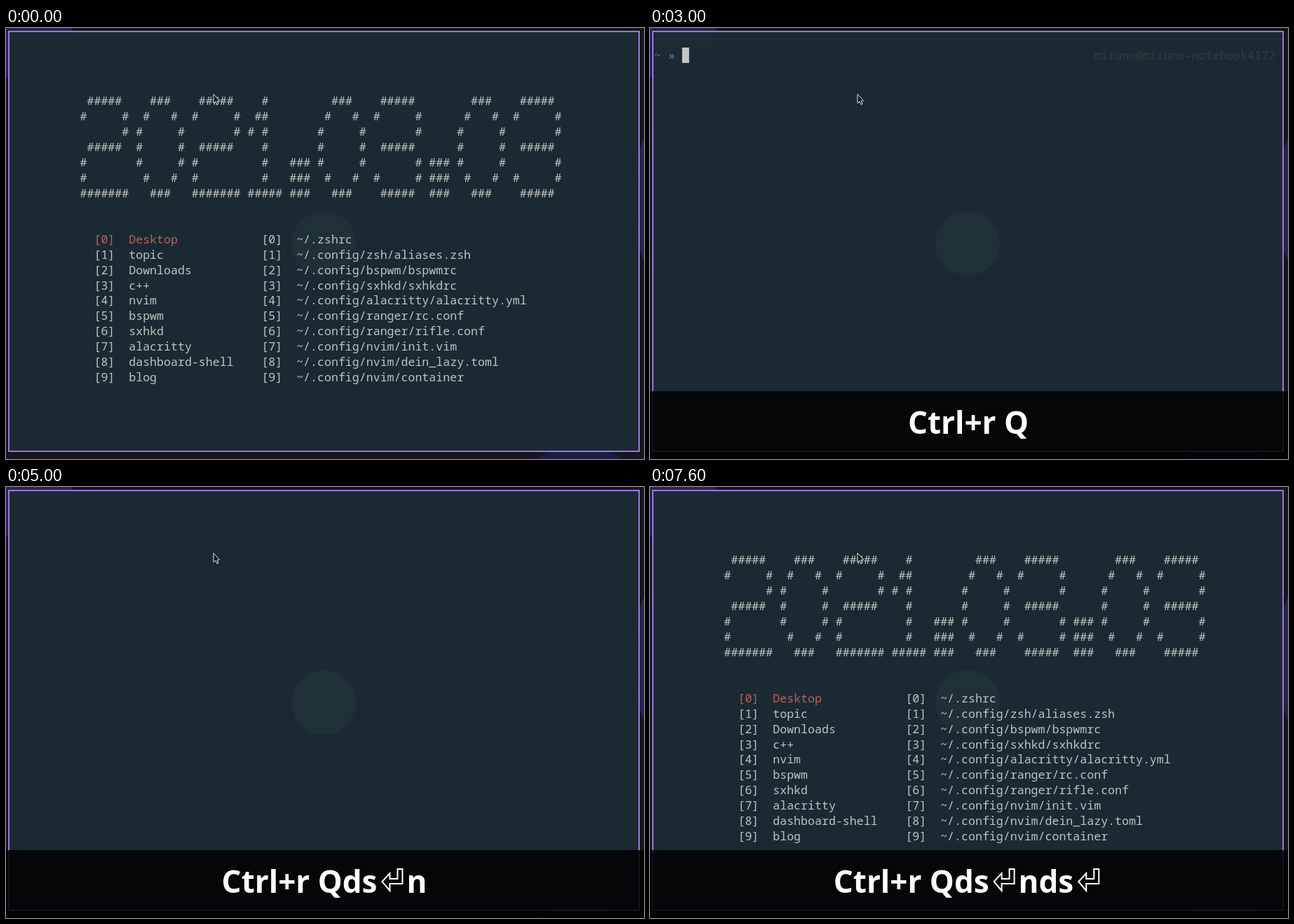
Animation of 910 by 616 pixels, one loop 8 s. Source, as an HTML page with a canvas:

```html
<!DOCTYPE html>
<html lang="en">
<head>
<meta charset="utf-8">
<title>Terminal dashboard</title>
<style>
html, body { margin: 0; width: 100%; height: 100%; overflow: hidden; background: #17151f; }
canvas { display: block; }
</style>
</head>
<body>
<canvas id="stage" width="910" height="616"></canvas>
<script>
const ctx = document.getElementById('stage').getContext('2d');
const LOOP = 8000, CELL = 9.955, LINE = 21.92;
const MONO = '16.6px "Noto Sans Mono", "DejaVu Sans Mono", monospace';
const USER = 'miruno', HOST = 'miruno-notebook4172';
const BG = '#1c2b33', FG = '#bfc3bf', RED = '#cc6666', GREEN = '#b5bd68',
      BLUE = '#7aa6da', DIM = '#363a3f';

const colX = col => 6 + col * CELL;
const rowY = row => 17 + row * LINE;

function put(col, row, text, color = FG, bold = false) {
  ctx.font = (bold ? 'bold ' : '') + MONO;
  ctx.fillStyle = color;
  ctx.fillText(text, colX(col), rowY(row) + 5.8);
}

function rect(x, y, w, h, color) {
  ctx.fillStyle = color;
  ctx.fillRect(x, y, w, h);
}

function disc(x, y, r, color) {
  ctx.fillStyle = color;
  ctx.beginPath();
  ctx.arc(x, y, r, 0, 7);
  ctx.fill();
}

function polygon(points, x, y) {
  ctx.beginPath();
  points.forEach(([px, py]) => ctx.lineTo(x + px, y + py));
  ctx.closePath();
}

function drawDesktop() {
  rect(0, 0, 910, 616, '#17151f');
  disc(10, -15, 86, '#28244e');
  disc(1133, 245, 240, '#28244e');
  disc(818, 707, 110, '#1f1c40');
  ctx.globalAlpha = 0.96;
  rect(4, 5, 899, 600, BG);
  ctx.globalAlpha = 1;
  disc(453, 308, 46, '#203037');
  ctx.strokeStyle = '#9878df';
  ctx.lineWidth = 2;
  ctx.strokeRect(4, 5, 899, 600);
}

// Dashboard
const ZERO = ['  ###  ', ' #   # ', '#     #', '#     #', '#     #', ' #   # ', '  ###  '];
const ONE = ['  #  ', ' ##  ', '# #  ', '  #  ', '  #  ', '  #  ', '#####'];
const TWO = [' ##### ', '#     #', '      #', ' ##### ', '#      ', '#      ', '#######'];
const THREE = [' ##### ', '#     #', '      #', ' ##### ', '      #', '#     #', ' ##### '];
const DOT = ['   ', '   ', '   ', '   ', '###', '###', '###'];
const DATE = [TWO, ZERO, TWO, ONE, DOT, ZERO, THREE, DOT, ZERO, THREE];
const DIRS = 'Desktop topic Downloads c++ nvim bspwm sxhkd alacritty dashboard-shell blog'.split(' ');
const FILES = ('.zshrc .config/zsh/aliases.zsh .config/bspwm/bspwmrc .config/sxhkd/sxhkdrc ' +
  '.config/alacritty/alacritty.yml .config/ranger/rc.conf .config/ranger/rifle.conf ' +
  '.config/nvim/init.vim .config/nvim/dein_lazy.toml .config/nvim/container').split(' ');

function dashboard() {
  for (let i = 0; i < 7; i++) put(10, 4 + i, DATE.map(glyph => glyph[i]).join(' '));
  DIRS.forEach((dir, i) => {
    const color = i ? FG : '#bd5f60';
    put(12, 13 + i, `[${i}]`, color);
    put(17, 13 + i, dir, color);
    put(36, 13 + i, `[${i}]`);
    put(41, 13 + i, '~/' + FILES[i]);
  });
}

// File manager
const HOME = ('beam 10 bin 88 byteexec 1 cache 28 cargo 2 colors 9 config 77 fonts 2 gnupg 5 ' +
  'ipython 3 LfCache 3 local 3 lyrics 0 mozilla 3 nano 1 ncmpcpp 2 npm 5 nvim 1 pki 1 ' +
  'pylint.d 14 rustup 5 ssr 4 urxvt 1').match(/\S+ \d+/g).map(entry => entry.split(' '));
const PREVIEW = ('logs replica global.yaml masquerade_cache masquerade_cache.cloudfront proxies.yaml ' +
  'proxystats.csv settings.yaml tls_session_states uninstall_url.txt').split(' ');

function folderIcon(x, row, color) {
  const y = rowY(row) - 5;
  rect(x, y, 5, 3, color);
  rect(x, y + 1.5, 11.5, 8, color);
}

function fileIcon(x, row) {
  const y = rowY(row) - 6;
  for (let i = 0; i < 4; i++) rect(x, y + i * 3.3, i < 3 ? 10 : 7, 1.5, FG);
}

function ranger(showPreview) {
  put(0, 0, `${USER}@${HOST}`, GREEN, true);
  put(27, 0, `/home/${USER}/`, BLUE, true);
  put(40, 0, '.beam', '#d0d3d0', true);
  ctx.strokeStyle = '#b3b9b7';
  ctx.lineWidth = 1.4;
  ctx.strokeRect(10.5, 40, 887, 526);
  rect(388.3, 40, 1.4, 526, '#b3b9b7');
  rect(15, 50, 369, 22, BLUE);
  HOME.forEach(([name, count], i) => {
    const color = i ? BLUE : BG;
    folderIcon(24.5, i + 2, color);
    put(4, i + 2, '.' + name, color, true);
    put(37 - count.length, i + 2, count, color, true);
  });
  if (showPreview) {
    rect(394, 50, 498, 22, BLUE);
    PREVIEW.forEach((name, i) => {
      const isDir = i < 2, color = i === 0 ? BG : isDir ? BLUE : FG;
      isDir ? folderIcon(403.5, i + 2, color) : fileIcon(403.5, i + 2);
      put(42, i + 2, name, color, isDir);
    });
  }
  put(0, 26, `drwxr-x--- 4 ${USER} ${USER} 10 2021-03-03 19:10`);
  put(60, 26, '463K sum, 264G free  1/56  Top');
}

// Shell
function prompt(row, typed) {
  for (let col = 0; col < 90; col++) rect(colX(col) + 1.5, rowY(row) - 0.8, 7, 1.2, DIM);
  const line = row + 1, cursor = 4 + typed.length, top = rowY(line) - 11;
  put(0, line, '~', '#2b7f9e');
  put(2, line, '»', '#7672e0');
  put(63, line, `${USER}@${HOST}`, DIM);
  put(4, line, typed, GREEN);
  const suggesting = typed === 'd';
  rect(colX(cursor), top, CELL, 22, suggesting ? '#686b6c' : '#c5c8c6');
  if (suggesting) put(cursor, line, 's', '#a3a6a5');
}

const INFO = [
  ['Kernel', '5.10.13-arch1-2'], ['Uptime', '5 days, 1 hour, 41 mins'],
  ['Packages', '1074 (pacman)'], ['Shell', 'zsh 5.8'], ['WM', 'bspwm'],
  ['Theme', 'ctlos-qogir-dark'], ['Icons', 'Qogir-dark'], ['Terminal', 'alacritty'],
  ['Font', 'Clear Sans Medium, Medium 9'], ['Memory', '3283MiB / 7865MiB'],
  ['CPU Usage', '75%'], ['Disk (/)', '16G / 295G (6%)']
];
const PALETTE = ['#1d1f21', RED, GREEN, '#f0c674', '#81a2be', '#a590c4', '#8abeb7', '#c5c8c6'];

function neofetch(count = INFO.length) {
  rect(15, 12, 340, 340, '#81a2be');
  put(41, 0, USER, RED, true);
  put(47, 0, '@');
  put(48, 0, HOST, RED, true);
  put(41, 1, '-'.repeat(26));
  INFO.slice(0, count).forEach(([label, value], i) => {
    put(41, i + 2, label, GREEN, true);
    put(41 + label.length, i + 2, ': ' + value);
  });
  if (count === INFO.length)
    PALETTE.forEach((color, i) => rect(colX(41 + i * 3), 335, CELL * 3 + 0.3, 22, color));
}

function fetched(typed) {
  neofetch();
  prompt(18, typed);
}

// Pressed keys
const RETURN_WIDTH = 42;
const RETURN_KEY = [[23, 0], [30, 0], [30, 21], [12, 21], [12, 31], [1, 18], [12, 6], [12, 14], [23, 14]];

function showKeys(keys, underlined) {
  rect(0, 519, 910, 97, 'rgba(0, 0, 0, 0.85)');
  ctx.font = 'bold 44px "Noto Sans", "Open Sans", sans-serif';
  const parts = keys.split(/(⏎)/);
  const width = part => part === '⏎' ? RETURN_WIDTH : ctx.measureText(part).width;
  let x = 454 - parts.reduce((sum, part) => sum + width(part), 0) / 2;
  for (const part of parts) {
    if (part === '⏎') {
      polygon(RETURN_KEY, x + 6, 546);
      ctx.strokeStyle = '#fff';
      ctx.lineWidth = 2;
      ctx.stroke();
    } else {
      ctx.fillStyle = '#fff';
      ctx.fillText(part, x, 579.5);
    }
    x += width(part);
  }
  if (underlined) {
    const last = width(keys.slice(-1));
    rect(x - last + 1, 582, last - 2, 2, '#fff');
  }
}

function drawPointer() {
  polygon([[0, 0], [0, 13], [3, 10.5], [5, 15], [7, 14], [5.2, 9.8], [8.5, 9.3]], 296, 94.5);
  ctx.fillStyle = '#11181c';
  ctx.fill();
  ctx.strokeStyle = '#e8e8e8';
  ctx.lineWidth = 1;
  ctx.stroke();
}

// Start time, screen, pressed keys, last key underlined
const SCENES = [
  [0, dashboard],
  [1000, dashboard, 'Ctrl+r', true],
  [1100, () => ranger(false), 'Ctrl+r'],
  [1200, () => ranger(true), 'Ctrl+r'],
  [3000, () => prompt(0, ''), 'Ctrl+r Q'],
  [3600, () => prompt(0, 'd'), 'Ctrl+r Qd', true],
  [3700, () => prompt(0, 'ds'), 'Ctrl+r Qds'],
  [3900, () => prompt(0, 'ds'), 'Ctrl+r Qds⏎', true],
  [4000, dashboard, 'Ctrl+r Qds⏎'],
  [4900, dashboard, 'Ctrl+r Qds⏎n', true],
  [5000, () => {}, 'Ctrl+r Qds⏎n'],
  [5100, () => neofetch(6), 'Ctrl+r Qds⏎n'],
  [5200, () => neofetch(), 'Ctrl+r Qds⏎n'],
  [5300, () => fetched(''), 'Ctrl+r Qds⏎n'],
  [7100, () => fetched('d'), 'Ctrl+r Qds⏎nd', true],
  [7200, () => fetched('ds'), 'Ctrl+r Qds⏎nds'],
  [7400, () => fetched('ds'), 'Ctrl+r Qds⏎nds⏎', true],
  [7500, dashboard, 'Ctrl+r Qds⏎nds⏎', true],
  [7600, dashboard, 'Ctrl+r Qds⏎nds⏎']
];

const startTime = performance.now();
function frame() {
  const time = (performance.now() - startTime) % LOOP;
  const [, screen, keys, underlined] = SCENES.filter(scene => scene[0] <= time).pop();
  drawDesktop();
  screen();
  if (keys) showKeys(keys, underlined);
  drawPointer();
  requestAnimationFrame(frame);
}
frame();
</script>
</body>
</html>
```
